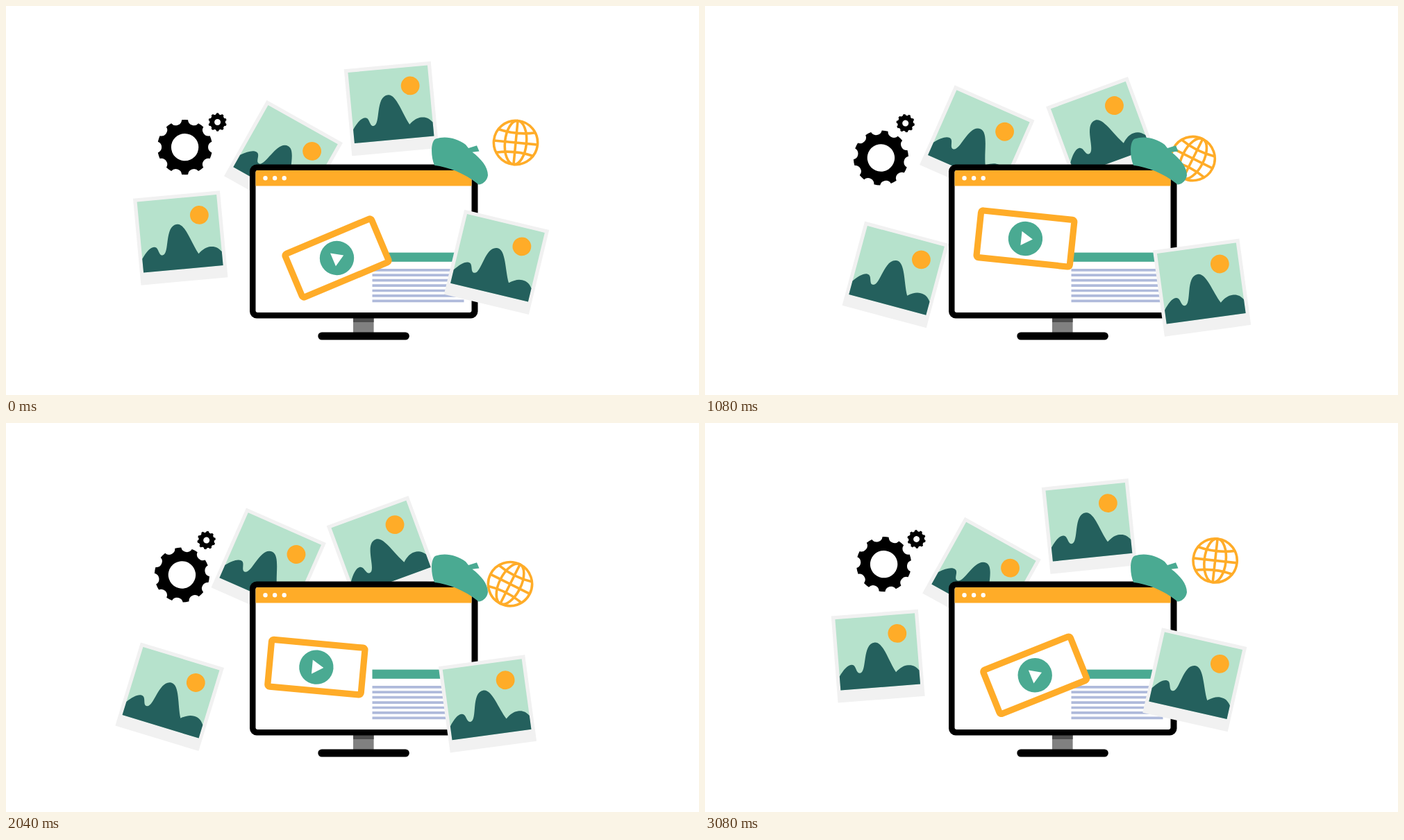
Animation, 998 px wide and 561 px high, one loop 3.12 s. Source, as an HTML page:

```html
<!DOCTYPE html>
<html lang="en">
<head>
<meta charset="utf-8">
<title>Floating pictures</title>
<style>
  html, body { margin: 0; width: 100%; height: 100%; overflow: hidden; background: #fff; }
  svg { display: block; width: 100vw; height: 100vh; }
</style>
</head>
<body>
<svg viewBox="0 0 998 561">
  <defs>
    <g id="photo">
      <rect x="-62.75" y="-62.75" width="125.5" height="125.5" fill="#f1f1f1"/>
      <rect x="-57.5" y="-57.5" width="115" height="102.5" fill="#b6e2cc"/>
      <circle cx="30.1" cy="-30.4" r="13.4" fill="#ffac28"/>
      <path fill="#24605d" d="M-57.5 25C-51 16 -45 9.7 -39 9.7C-32 9.7 -34 22.5 -28 22.5C-17 22.5 -22 -20 -3 -20C9 -20 14.5 8 24 25C31 19 36 16.500 42 16.500C49 16.500 53 19 57.5 25V45H-57.5Z"/>
    </g>
  </defs>

  <path id="bigGear" fill-rule="evenodd"/>
  <path id="smallGear" fill-rule="evenodd"/>
  <use id="leftPhoto" href="#photo"/>
  <use id="backPhoto" href="#photo"/>
  <use id="topPhoto" href="#photo"/>

  <g id="globe" fill="none" stroke="#ffac28" stroke-width="3.6">
    <circle r="31.6"/>
    <ellipse rx="15.5" ry="31.6"/>
    <path d="M0 -31.6V31.6M-31.6 0H31.6M-27 -17Q0 -10.5 27 -17M-27 17Q0 10.5 27 17"/>
  </g>

  <g id="monitor">
    <rect x="500" y="449" width="29.6" height="23" fill="#808080"/>
    <rect x="500" y="449" width="29.6" height="7" fill="#4d4d4d"/>
    <rect x="449.3" y="470.5" width="131.5" height="11" rx="5.5"/>
    <rect x="351" y="228.5" width="328.5" height="222" rx="10"/>
    <rect x="359.5" y="237" width="311" height="205" rx="3" fill="#fff"/>
    <path d="M359.5 259.5V240q0 -3 3 -3H667.5q3 0 3 3V259.5Z" fill="#ffac28"/>
    <path d="M373.5 248.3h0m13.6 0h0m13.6 0h0" stroke="#fff" stroke-width="6.4" stroke-linecap="round"/>
    <rect x="527.5" y="355.6" width="132" height="13.2" fill="#4aaa92"/>
    <path id="lines" stroke="#afbadb" stroke-width="3.7"/>
  </g>

  <g id="panel">
    <rect x="-67.5" y="-34" width="135" height="68" rx="3" fill="#fff" stroke="#ffac28" stroke-width="9.2"/>
    <circle r="24.7" fill="#4aaa92"/>
    <path d="M-6 -10.2L10.5 0L-6 10.2Z" fill="#fff"/>
  </g>

  <path fill="#4aaa92" d="M617 229.8C611 215 612 194 619 191.5C632 187 649 190 662 200L666 205L678 201.3L681.5 209.5L671.5 210.8C684 220 694 232 694 244C693 252 687 257 680.5 257.5C662 242 638 232.5 617 229.8Z"/>
  <use id="rightPhoto" href="#photo"/>
</svg>
<script>
const LOOP = 3120, STEP = 40, HALF = LOOP / 2;
const SVG = "http://www.w3.org/2000/svg";
const $ = id => document.getElementById(id);

function place(id, { x, y }, angle) {
  $(id).setAttribute("transform",
    `translate(${x.toFixed(2)} ${y.toFixed(2)}) rotate(${angle.toFixed(2)})`);
}

function track(d) {
  const path = document.createElementNS(SVG, "path");
  path.setAttribute("d", d);
  return path;
}

// Follows a loop of two arcs, each at steady speed, tilting there and back.
function drifter(id, loop, from, to, turn = HALF) {
  const path = track(loop);
  const whole = path.getTotalLength();
  const first = track(loop.slice(0, loop.lastIndexOf("Q"))).getTotalLength();
  return t => {
    const going = t < turn;
    const k = going ? t / turn : (LOOP - t) / (LOOP - turn);
    const reach = going ? first * k : whole - (whole - first) * k;
    place(id, path.getPointAtLength(reach), from + (to - from) * k);
  };
}

const parts = [
  drifter("topPhoto", "M555 148Q594 164 559 198Q515 173 555 148", -5.3, -26.8),
  drifter("leftPhoto", "M251.2 334.5Q306 362 254 414Q203 372 251.2 334.5", -5.3, 25.4, 1630),
  drifter("backPhoto", "M399.5 221.2Q405 198 380.5 192.5Q371 217.5 399.5 221.2", 29.3, 21.3),
  drifter("rightPhoto", "M706.5 369.4Q738 389 702.5 420.5Q679 391 706.5 369.4", 13.5, -17.2),
  drifter("panel", "M476.5 363.5Q482 330 446 336Q442 370 476.5 363.5", -22.8, 18.2, 1540),
  drifter("globe", "M734 197Q686 192 710 240Q748.5 226.5 734 197", 5.5, 36)
];

const TEETH = 10, PITCH = 360 / TEETH;

function gearPath(r, hole) {
  const at = deg => {
    const a = deg * Math.PI / 180;
    return `${(r * Math.sin(a)).toFixed(2)} ${(-r * Math.cos(a)).toFixed(2)}`;
  };
  const tooth = PITCH * 0.18, notch = r * 0.215;
  let d = "M" + at(-tooth);
  for (let a = 0; a < 360; a += PITCH) {
    d += `A${r} ${r} 0 0 1 ${at(a + tooth)}A${notch} ${notch} 0 0 0 ${at(a + PITCH - tooth)}`;
  }
  const arc = `a${hole} ${hole} 0 1 0 `;
  return `${d}ZM${-hole} 0${arc}${2 * hole} 0${arc}${-2 * hole} 0Z`;
}

function turnGears(t) {
  const swing = (1 - Math.cos(2 * Math.PI * t / LOOP)) / 2;
  const spin = 8 * PITCH * t / LOOP;
  place("bigGear", { x: 257.6 - 5.3 * swing, y: 203.6 + 19.6 * swing }, -spin);
  place("smallGear", { x: 304.6 - 20.3 * swing, y: 167.5 + 2 * swing }, spin);
}

$("bigGear").setAttribute("d", gearPath(39.6, 19.7));
$("smallGear").setAttribute("d", gearPath(13.2, 4.5));

let rows = "";
for (let i = 0; i < 7; i++) rows += `M527.5 ${380.8 + 7.42 * i}h132`;
$("lines").setAttribute("d", rows);

const start = performance.now();
function tick() {
  const now = (performance.now() - start) % LOOP;
  const t = Math.floor(now / STEP) * STEP;
  parts.forEach(move => move(t));
  turnGears(t);
  requestAnimationFrame(tick);
}
tick();
</script>
</body>
</html>
```
